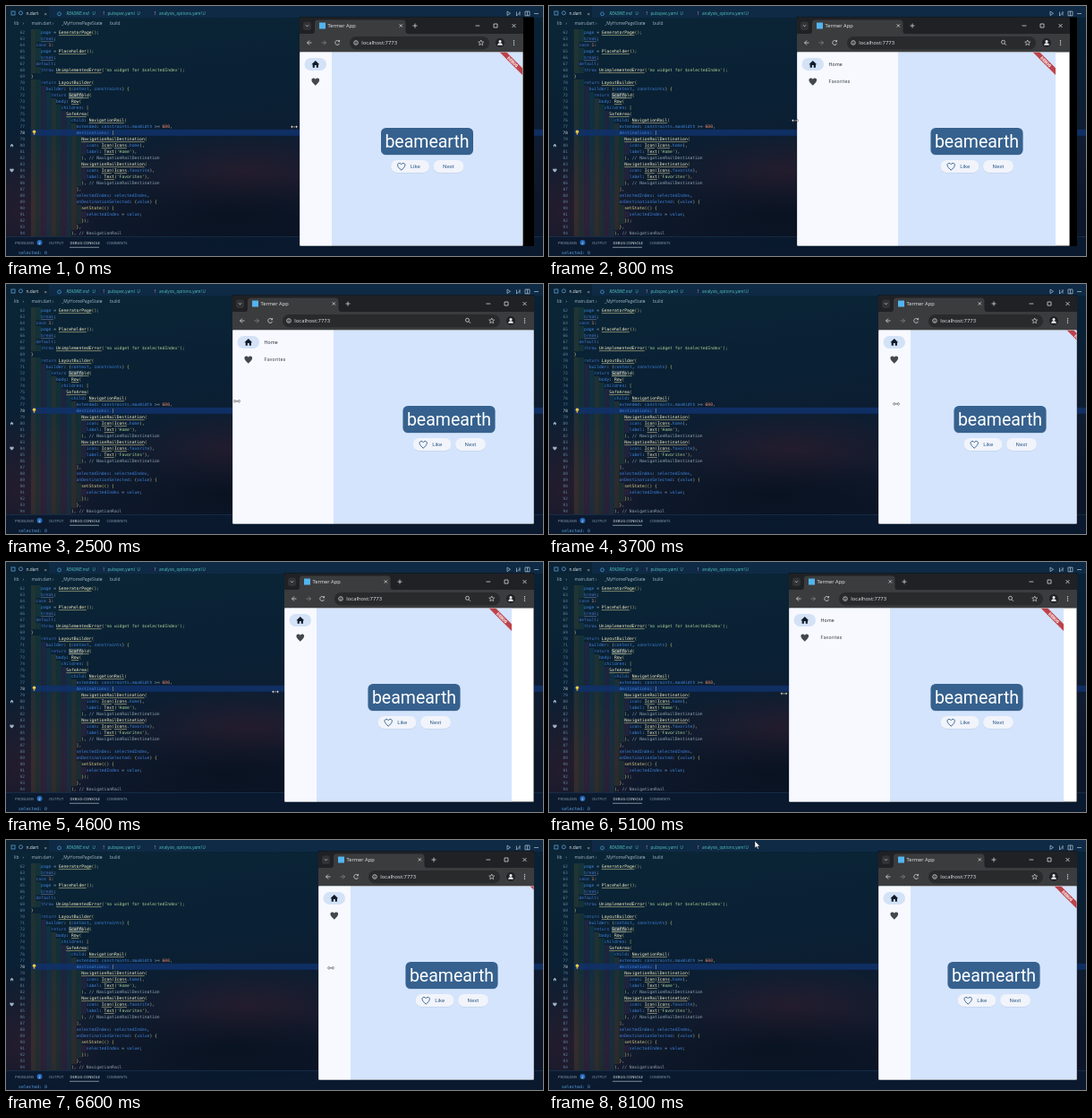
These frames come from a looping animation (600 by 279 pixels, 8200 ms). An HTML page:

```html
<!DOCTYPE html>
<html lang="en">
<head>
<meta charset="utf-8">
<title>Resizing window</title>
<style>
  html, body { margin: 0; width: 100%; height: 100%; overflow: hidden; background: #0a2133; }
  svg { display: block; width: 600px; height: 279px; }
  text { white-space: pre; }
  .ui { font-family: "Open Sans", sans-serif; }
  .rb { font-family: Roboto, sans-serif; }
  .mono { font-family: "DejaVu Sans Mono", monospace; }
  .line { fill: none; stroke: #d5d7d9; stroke-width: .8; }
</style>
</head>
<body>
<svg viewBox="0 0 600 279" xmlns="http://www.w3.org/2000/svg">
  <defs>
    <linearGradient id="sky" x2=".3" y2="1">
      <stop offset="0" stop-color="#0a2636"/>
      <stop offset=".45" stop-color="#0a2034"/>
      <stop offset=".8" stop-color="#101b2e"/>
      <stop offset="1" stop-color="#0c1628"/>
    </linearGradient>
    <radialGradient id="dusk">
      <stop offset="0" stop-color="#341c2c" stop-opacity=".55"/>
      <stop offset="1" stop-color="#341c2c" stop-opacity="0"/>
    </radialGradient>
    <radialGradient id="shade">
      <stop offset="0" stop-color="#050d18" stop-opacity=".55"/>
      <stop offset="1" stop-color="#050d18" stop-opacity="0"/>
    </radialGradient>
    <clipPath id="pageClip"><rect id="pageBox" y="51.500" height="216"/></clipPath>
    <clipPath id="bodyClip"><rect id="bodyBox" y="51.500" height="216"/></clipPath>
    <path id="heart" d="M0 4.4C-6.6-.8-4.9-4.2-2.4-4.2-1.2-4.2-.4-3.5 0-2.8.4-3.5 1.2-4.2 2.4-4.2 4.9-4.2 6.6-.8 0 4.4Z"/>
    <path id="house" d="M-4.8.4L0-4.2 4.8.4H3.4V4.2H1V1.2H-1V4.2H-3.4V.4Z"/>
  </defs>

  <!-- editor -->
  <rect width="600" height="279" fill="url(#sky)"/>
  <ellipse cx="20" cy="225" rx="90" ry="85" fill="url(#dusk)"/>
  <ellipse cx="270" cy="185" rx="140" ry="45" fill="url(#dusk)"/>
  <ellipse cx="250" cy="235" rx="170" ry="50" fill="url(#shade)"/>
  <rect width="600" height="13" fill="#0e2a45"/>
  <rect width="48" height="13" fill="#0b2334"/>
  <g id="stripes"></g>
  <rect x="28" y="137.800" width="572" height="7" fill="#10326c" opacity=".85"/>
  <g id="editor"></g>
  <g fill="none" stroke="#b8c7d2" stroke-width=".7">
    <path d="M560 6L563.500 8.300 560 10.500ZM570.500 6.500V11M574 6V10.500M570.500 11L574 7.500M580 6H585V10.800H580ZM582.500 6V10.800M590 8.500H595"/>
  </g>
  <rect x="6" y="6" width="4" height="4" fill="none" stroke="#5b9fd8" stroke-width=".8"/>
  <circle cx="16.500" cy="7.800" r="2" fill="none" stroke="#5b9fd8" stroke-width=".8"/>
  <circle cx="59.500" cy="8.800" r="1.900" fill="none" stroke="#4fa6dc" stroke-width=".7"/>
  <g fill="#9fb4c4">
    <use href="#house" transform="translate(6.500 155.500) scale(.42)"/>
    <use href="#heart" transform="translate(6.500 183.500) scale(.48)"/>
  </g>
  <circle cx="31.500" cy="140.300" r="1.800" fill="#ffcc3d"/>
  <rect x="30.700" y="142" width="1.600" height="1.700" fill="#d9a520"/>
  <rect y="257.500" width="600" height="21.500" fill="#0a1a30" opacity=".85"/>
  <path d="M0 257.500H600" stroke="#1b3a58" stroke-width=".6"/>
  <path d="M71 269.300H104" stroke="#c8d2da" stroke-width=".6"/>
  <circle cx="37.500" cy="264" r="3" fill="#2469b8"/>
  <g id="panel"></g>

  <!-- browser window -->
  <rect id="back" y="12.500" height="255.500" fill="#000"/>
  <rect id="frame" y="12.500" height="255.500" rx="2" fill="#202124"/>
  <rect id="bar" y="31" height="21" fill="#3b3c3e"/>
  <rect id="pill" y="34" height="14.500" rx="7.200" fill="#282a2c"/>
  <g id="left">
    <rect x="4" y="17.500" width="9" height="9.500" rx="3" fill="#323336"/>
    <path class="line" d="M7 21.300L8.500 22.800 10 21.300"/>
    <path d="M14 31Q17 31 17 28V19Q17 15.500 20.500 15.500H115Q118.500 15.500 118.500 19V28Q118.500 31 121.500 31Z" fill="#3b3c3e"/>
    <rect x="22" y="18.500" width="7" height="7" fill="#54b4ee"/>
    <path class="line" d="M111.700 20.300L114.900 23.500M114.900 20.300L111.700 23.500M126.500 22H131.500M129 19.500V24.500"/>
    <path class="line" d="M13.500 41H8.500M11 38.500L8.500 41 11 43.500"/>
    <path class="line" d="M24.500 41H29.500M27 38.500L29.500 41 27 43.500" opacity=".45"/>
    <path class="line" d="M44.300 39.500A2.500 2.500 0 1 0 44.600 41.800M44.600 38V39.800H42.800"/>
    <circle cx="63" cy="41" r="2.300" class="line"/>
    <path class="line" d="M63 40.600V42.400M63 39.400V39.900"/>
  </g>
  <g id="right">
    <path class="line" d="M-53.500 22H-48.700M-33 20H-29V24H-33ZM-12.500 20L-8.500 24M-8.500 20L-12.500 24"/>
    <g id="search">
      <circle cx="-74.500" cy="40.300" r="2" class="line"/>
      <path class="line" d="M-73 41.800L-71 43.800"/>
    </g>
    <path class="line" transform="translate(-47.300 41) scale(.85)" d="M0-3.500L1-1.200 3.500-1 1.600.7 2.200 3.200 0 1.800-2.200 3.200-1.600.7-3.500-1-1-1.200Z"/>
    <circle cx="-26" cy="41" r="5" fill="#202225"/>
    <circle cx="-26" cy="39.500" r="1.500" fill="#f0f2f4"/>
    <path d="M-28.800 43.700A2.800 2.500 0 0 1-23.200 43.700Z" fill="#f0f2f4"/>
    <g fill="#d5d7d9"><circle cx="-10.500" cy="38.700" r=".7"/><circle cx="-10.500" cy="41" r=".7"/><circle cx="-10.500" cy="43.300" r=".7"/></g>
  </g>
  <g clip-path="url(#pageClip)">
    <rect y="51" width="600" height="217" fill="#fff"/>
    <g clip-path="url(#bodyClip)">
      <rect y="51" width="700" height="217" fill="#d4e4fd"/>
      <rect id="rail" y="51" height="217" fill="#f7f9ff"/>
      <g id="nav">
        <rect x="5.500" y="58" width="24.500" height="14" rx="7" fill="#d3e2f7"/>
        <use href="#house" transform="translate(17.800 64.800) scale(.92)" fill="#101c2b"/>
        <use href="#heart" transform="translate(17.800 84.500) scale(.94)" fill="#43474e"/>
        <g id="labels"></g>
      </g>
      <g id="card">
        <rect x="-51.500" y="136.500" width="103" height="30" rx="5.500" fill="#1c3550" opacity=".2"/>
        <rect x="-51.500" y="136" width="103" height="30" rx="5.500" fill="#36618e"/>
        <g fill="#253a58" opacity=".15">
          <rect x="-40.500" y="172.600" width="43" height="14" rx="7"/>
          <rect x="7" y="172.600" width="34" height="14" rx="7"/>
        </g>
        <g fill="#f1f4fb">
          <rect x="-40.500" y="172" width="43" height="14" rx="7"/>
          <rect x="7" y="172" width="34" height="14" rx="7"/>
        </g>
        <use href="#heart" transform="translate(-28.800 179.200) scale(.9)" fill="none" stroke="#36618e" stroke-width="1.100"/>
      </g>
      <g id="banner"><rect x="-27" y="12.600" width="54" height="5.400" fill="#bb1f24" opacity=".82"/></g>
    </g>
  </g>

  <path id="resize" d="M-4-.2L-2-1.800V-.6H2V-1.800L4-.2 2 1.400V.2H-2V1.400Z" fill="#fff" stroke="#222" stroke-width=".4"/>
  <path id="arrow" d="M0-4V4L1.900 2.300 3.200 5.100 4.400 4.500 3.100 1.900H5.500Z" fill="#fff" stroke="#222" stroke-width=".5"/>
</svg>
<script>
const $ = id => document.getElementById(id);
const NS = 'http://www.w3.org/2000/svg';

function make(parent, tag, attrs) {
  const el = document.createElementNS(NS, tag);
  for (const k in attrs) el.setAttribute(k, attrs[k]);
  return parent.appendChild(el);
}
function label(parent, str, x, y, size, fill, cls, more) {
  const el = make(parent, 'text', { x, y, 'font-size': size, fill, class: cls, ...more });
  el.textContent = str;
  return el;
}

// Code: each entry is [indent columns, text], one entry per line.
const FIRST = 62, PITCH = 7, COL = 2.82, CODE_X = 27.8;
const code = [
  [4, 'page = GeneratorPage();'], [4, 'break;'], [2, 'case 1:'],
  [4, 'page = Placeholder();'], [4, 'break;'], [2, 'default:'],
  [4, "throw UnimplementedError('no widget for $selectedIndex');"], [0, '}'],
  [4, 'return LayoutBuilder('], [6, 'builder: (context, constraints) {'],
  [8, 'return Scaffold('], [10, 'body: Row('], [12, 'children: ['],
  [14, 'SafeArea('], [16, 'child: NavigationRail('],
  [18, 'extended: constraints.maxWidth >= 600,'], [18, 'destinations: ['],
  [20, 'NavigationRailDestination('], [22, 'icon: Icon(Icons.home),'],
  [22, "label: Text('Home'),"], [20, '), // NavigationRailDestination'],
  [20, 'NavigationRailDestination('], [22, 'icon: Icon(Icons.favorite),'],
  [22, "label: Text('Favorites'),"], [20, '), // NavigationRailDestination'],
  [18, '],'], [18, 'selectedIndex: selectedIndex,'],
  [18, 'onDestinationSelected: (value) {'], [20, 'setState(() {'],
  [22, 'selectedIndex = value;'], [20, '});'], [18, '},'], [16, '), // NavigationRail']
];
const TOKENS = /\/\/.*|'[^']*'|\b[A-Z]\w*|\b\d+|\b(?:return|throw|break|case|default)\b|\bsetState\b|\w+|[^\w']/g;
const colour = s =>
  s.startsWith('//') ? '#93a5b4' :
  s[0] === "'" ? '#a9cf94' :
  /^[A-Z]/.test(s) ? '#f4efc4' :
  /^\d/.test(s) ? '#f78c6c' :
  /^(return|throw|break|case|default)$/.test(s) ? '#4670c4' :
  s === 'setState' ? '#e3d58c' :
  /^\w/.test(s) ? '#3f82d8' :
  /[()[\]{}]/.test(s) ? '#d6c878' : '#a9bccb';

const ed = $('editor');
make(ed, 'rect', { x: 70, y: 96.7, width: 16, height: 6.6, fill: '#c8d4dc', opacity: .22 });
code.forEach(([col, str], i) => {
  const y = 31.4 + i * PITCH, x = CODE_X + col * COL;
  label(ed, FIRST + i, 15.5, y, 4.5, i === 16 ? '#d0dbe4' : '#5d7f96', 'mono');
  const line = label(ed, '', x, y, 4.7, '#fff', 'mono');
  let at = 0;
  for (const tok of str.match(TOKENS)) {
    make(line, 'tspan', { fill: colour(tok) }).textContent = tok;
    if (/^[A-Z]|^break/.test(tok))
      make(ed, 'path', {
        d: `M${x + at * COL} ${y + 1.2}h${tok.length * COL}`,
        stroke: tok === 'break' ? '#6f7fae' : '#c9c28c', 'stroke-width': .6
      });
    at += tok.length;
  }
});

// Tinted indent columns
const tints = ['#a08a30', '#3c8a4a', '#8a3c80', '#2c8a96'];
code.forEach(([col], i) => {
  for (let k = 0; k < col / 2; k++)
    make($('stripes'), 'rect', {
      x: CODE_X + k * 2 * COL, y: 26 + i * PITCH, width: 2 * COL, height: PITCH,
      fill: tints[k % 4], opacity: .15
    });
});

label(ed, 'n.dart', 22.5, 10.4, 4.9, '#e4edf2', 'ui');
label(ed, '×', 42.5, 10.6, 6, '#b5c5d0', 'ui');
[['README.md', 67.5, 96.5], ['pubspec.yaml', 113.5, 146.5], ['analysis_options.yaml', 171, 219.5]].forEach(([name, x, mark], i) => {
  label(ed, name, x, 10.4, 4.7, '#54c4ba', 'ui', i ? {} : { 'font-style': 'italic' });
  label(ed, 'U', mark, 10.4, 4.5, '#54c4ba', 'ui');
  if (i) label(ed, '!', x - 5, 10.4, 5, '#b06fd0', 'ui', { 'font-weight': 700 });
});
[['lib', 9], ['›', 18.5], ['main.dart', 28.5], ['›', 52], ['_MyHomePageState', 62], ['›', 106], ['build', 116]].forEach(([s, x]) =>
  label(ed, s, x, 21, 4.9, '#a3b6c3', 'ui'));

const tail = $('panel');
[['PROBLEMS', 10], ['OUTPUT', 48], ['DEBUG CONSOLE', 71.5], ['COMMENTS', 112.5]].forEach(([s, x], i) =>
  label(tail, s, x, 265.8, 4.1, i === 2 ? '#f0f4f7' : '#8fa5b4', 'ui'));
label(tail, '2', 37.5, 265.6, 4.2, '#fff', 'ui', { 'text-anchor': 'middle' });
label(tail, 'selected: 0', 14, 277.4, 4.8, '#5b9fe0', 'mono');

// Browser text
const mid = { 'text-anchor': 'middle' };
label($('left'), 'Termer App', 31.5, 24.2, 5.7, '#e8eaed', 'ui');
label($('left'), 'localhost:7773', 69.3, 43.2, 5.9, '#e8eaed', 'ui');
const navText = { 'letter-spacing': .24 };
label($('labels'), 'Home', 35.5, 66.9, 5.4, '#30343b', 'rb', navText);
label($('labels'), 'Favorites', 35.5, 86.3, 5.4, '#43474e', 'rb', navText);
label($('card'), 'beamearth', 0, 158.2, 19.5, '#fff', 'rb', mid);
label($('card'), 'Like', -13.2, 181.4, 6.2, '#36618e', 'rb', mid);
label($('card'), 'Next', 24, 181.4, 6.2, '#36618e', 'rb', mid);
label($('banner'), 'DEBUG', 0, 17, 4.6, '#fff', 'rb', { ...mid, 'font-weight': 900 });

// time, window left, painted right, page layout right, pointer x, pointer y
const LOOP = 8200, STEP = 100, POINTER_FREE = 7100, SCREEN_RIGHT = 590;
const poses = [
  [0, 328, 578, 577, 322, 135],
  [800, 277, 582, 566, 275, 128],
  [1600, 205, 590, 583, 203, 128],
  [2000, 206, 590, 590, 206, 129],
  [2500, 253, 590, 624, 258, 131],
  [3400, 368, 590, 618, 380, 133],
  [3700, 368, 590, 604, 388, 134],
  [3900, 368, 590, 590, 372, 138],
  [4600, 311, 590, 565, 301, 145],
  [5600, 225, 590, 585, 224, 149],
  [5800, 231, 590, 593, 236, 149],
  [6400, 330, 590, 620, 342, 146],
  [6800, 368, 590, 602, 384, 140],
  [7100, 368, 590, 590, 368, 115],
  [8100, 368, 590, 590, 230, 5]
];
function poseAt(t) {
  const i = poses.findIndex(p => p[0] > t);
  if (i < 0) return poses[poses.length - 1];
  const a = poses[i - 1], b = poses[i], k = (t - a[0]) / (b[0] - a[0]);
  return a.map((v, j) => v + (b[j] - v) * k);
}
const set = (id, attrs) => { for (const k in attrs) $(id).setAttribute(k, attrs[k]); };
const move = (id, x, y = 0, extra = '') => set(id, { transform: `translate(${x} ${y})${extra}` });
const show = (id, on) => set(id, { visibility: on ? 'visible' : 'hidden' });

function draw(t) {
  const [, l, r, edge, px, py] = poseAt(t);
  const width = r - l;
  // The rail opens once the page is wide enough.
  const open = Math.min(1, Math.max(0, (edge - l - 267) / 15));
  const rail = 36 + 77 * open;

  set('back', { x: l, width: SCREEN_RIGHT - l });
  set('frame', { x: l, width });
  set('bar', { x: l, width });
  set('pill', { x: l + 56, width: width - 94 });
  move('left', l);
  move('right', r);
  show('search', width > 265);

  set('pageBox', { x: l + .5, width: width - 1 });
  set('bodyBox', { x: l, width: edge - l });
  set('rail', { x: l, width: rail });
  move('nav', l);
  set('labels', { opacity: open });
  move('card', (l + rail + edge) / 2);
  move('banner', edge, 51.5, ' rotate(45)');

  const free = t >= POINTER_FREE;
  show('arrow', free);
  show('resize', !free);
  move(free ? 'arrow' : 'resize', px, py);
}

const start = performance.now();
function tick() {
  const t = Math.max(0, performance.now() - start) % LOOP;
  draw(Math.floor(t / STEP) * STEP);
  requestAnimationFrame(tick);
}
tick();
</script>
</body>
</html>
```
